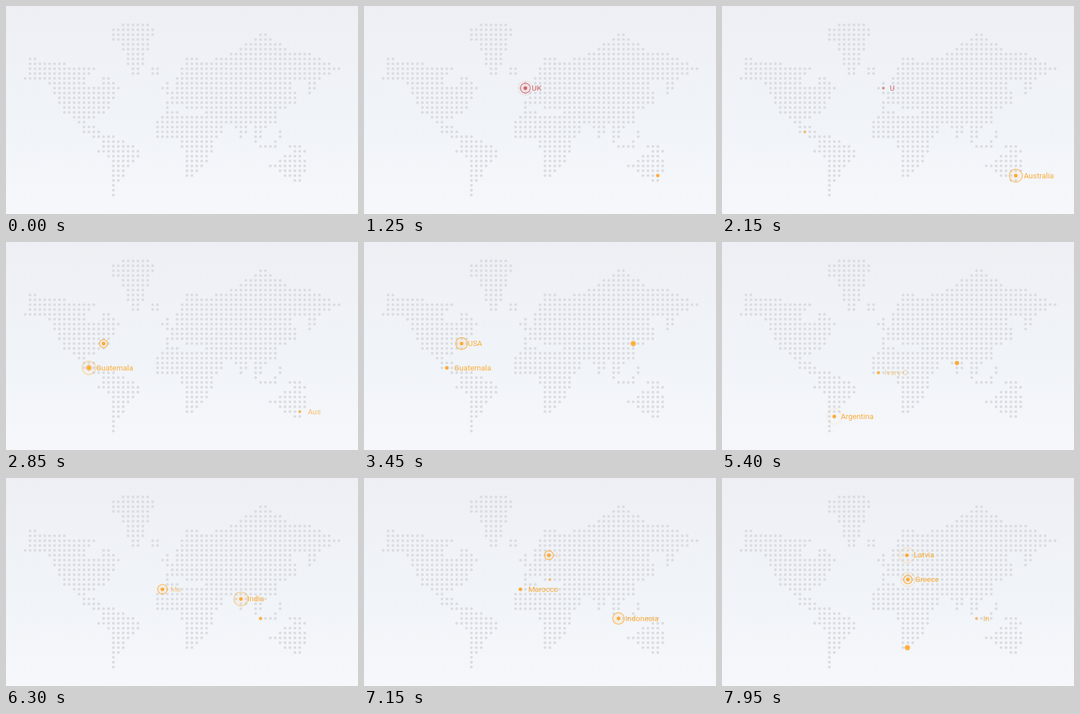
An HTML page for the animation above (8000 ms loop, 600 px wide and 356 px high).

```html
<!DOCTYPE html>
<html lang="en">
<head>
<meta charset="utf-8">
<title>Dotted world map</title>
<style>
  html, body { margin: 0; width: 100%; height: 100%; overflow: hidden; background: #f1f3f8; }
  svg { display: block; width: 100%; height: 100%; }
  text { font: 13px Roboto, Arial, sans-serif; white-space: pre; }
</style>
</head>
<body>
<svg viewBox="0 0 600 356">
  <defs>
    <linearGradient id="sky" x1="0" y1="0" x2="0" y2="1">
      <stop offset="0" stop-color="#eeeff4"/>
      <stop offset=".56" stop-color="#f0f4f8"/>
      <stop offset="1" stop-color="#f6f7fb"/>
    </linearGradient>
  </defs>
  <rect width="600" height="356" fill="url(#sky)"/>
  <g id="map" fill="#dbdce1"></g>
  <g id="pins"></g>
</svg>
<script>
const LOOP = 8000;
const LIFE = 1840;
const TYPE_AT = 380;
const LEAVE_AT = 1460;
const ORANGE = '#fcab37';
const map = document.getElementById('map');
const pins = document.getElementById('pins');

function set(el, attrs) {
  for (const k in attrs) el.setAttribute(k, attrs[k]);
}
function add(parent, tag, attrs) {
  const el = document.createElementNS('http://www.w3.org/2000/svg', tag);
  set(el, attrs);
  return parent.appendChild(el);
}
const gridX = col => 32.6 + col * 8.36;
const gridY = row => 32.4 + row * 8.32;
const clamp = v => Math.max(0, Math.min(1, v));
const mix = (a, b, u) => a + (b - a) * u;
const easeOut = u => 1 - (1 - u) * (1 - u);

// An outline is a few [row, west, east] corners; the coast runs straight between them.
function land(...corners) {
  corners.forEach(([row, west, east], i) => {
    const [row2, west2, east2] = corners[i + 1] || [row + 1, west, east];
    for (let r = row; r < row2; r++) {
      const u = (r - row) / (row2 - row);
      const end = Math.round(mix(east, east2, u));
      for (let c = Math.round(mix(west, west2, u)); c <= end; c++) {
        add(map, 'circle', { cx: gridX(c), cy: gridY(r), r: 2.4 });
      }
    }
  });
}

// Greenland, Iceland
land([0, 20, 25], [1, 18, 26], [3, 18, 25], [4, 20, 25], [10, 22, 23]);
land([9, 26, 27], [10, 26, 27]);
// The Americas
land([7, 1, 2], [8, 1, 8], [9, 1, 14], [11, 0, 12], [12, 5, 12], [13, 6, 19], [18, 8, 16], [20, 11, 12],
  [22, 12, 15], [24, 16, 20], [26, 15, 23], [28, 18, 22], [33, 18, 18], [35, 18, 18]);
land([11, 16, 17], [12, 16, 18]);
// Britain, Scandinavia, Iberia
land([12, 29, 29], [13, 28, 29], [14, 29, 29]);
land([7, 33, 35], [8, 33, 36]);
land([17, 29, 29], [18, 29, 31]);
// Europe and Asia
land([2, 48, 49], [5, 44, 53], [6, 42, 58], [9, 32, 64], [11, 31, 60], [12, 31, 54], [16, 29, 55], [17, 33, 53], [18, 37, 51]);
land([12, 58, 59], [14, 58, 58]);
land([21, 43, 45], [23, 44, 44]);
land([21, 47, 49], [24, 47, 47]);
land([22, 52, 52], [24, 51, 51], [25, 48, 51]);
// Africa and Arabia
land([19, 28, 51], [20, 27, 51], [21, 27, 40], [23, 27, 39], [24, 32, 38], [28, 33, 37], [31, 33, 34]);
// Australia
land([25, 54, 56], [26, 55, 57], [27, 53, 56], [29, 50, 57], [32, 55, 56]);

function place(name, start, col, row, gap, color = ORANGE) {
  const cx = gridX(col), cy = gridY(row);
  const g = add(pins, 'g', { fill: color });
  const ring = () => add(g, 'circle', { cx, cy, stroke: color, 'fill-opacity': 0.12 });
  return {
    name, start, g,
    rings: [ring(), ring()],
    dot: add(g, 'circle', { cx, cy }),
    label: add(g, 'text', { x: cx + gap, y: cy + 4.2 })
  };
}

const places = [
  place('UK', 350, 29, 13, 11, '#d26366'),
  place('Australia', 1120, 56, 31, 13.7),
  place('Guatemala', 2100, 13, 22, 12.5),
  place('USA', 2480, 16, 17, 10.6),
  place('China', 3225, 51, 17, 8.2),
  place('Ivory Coast', 3790, 28, 23, 10.3),
  place('Argentina', 4150, 19, 32, 11),
  place('India', 5220, 44, 21, 11),
  place('Marocco', 5850, 28, 19, 13.2),
  place('Indonesia', 6190, 48, 25, 11.4),
  place('Latvia', 6740, 33.8, 12, 11.8),
  place('Greece', 7100, 34, 17, 12.3),
  place('South Africa', 7725, 33.9, 31, 12)
];

const pulses = [
  { from: 160, len: 800, r0: 2.5, r1: 12.3 },
  { from: 730, len: 560, r0: 3.5, r1: 13.2 }
];

function drawPlace(p, t) {
  const alive = t >= 0 && t < LIFE;
  p.g.setAttribute('display', alive ? 'inline' : 'none');
  if (!alive) return;

  pulses.forEach(({ from, len, r0, r1 }, i) => {
    const u = clamp((t - from) / len);
    set(p.rings[i], {
      r: mix(r0, r1, easeOut(u)),
      'stroke-width': 1.2 + 0.6 * u,
      opacity: u > 0 ? 1 - u ** 1.6 : 0
    });
  });

  const grow = clamp(t / 150);
  const leave = clamp((t - LEAVE_AT) / (LIFE - LEAVE_AT));
  set(p.dot, {
    r: mix(2, 3.1, grow) * mix(1, 0.75, leave),
    opacity: mix(0.5, 1, grow) * mix(1, 0.6, leave)
  });

  const typed = Math.min(clamp((t - TYPE_AT) / 400), 1 - leave);
  const flicker = 0.68 - 0.28 * Math.cos((t - 1650) / 300 * 2 * Math.PI);
  p.label.textContent = p.name.slice(0, Math.ceil(p.name.length * typed));
  p.label.setAttribute('opacity', leave > 0 ? flicker : clamp((t - TYPE_AT + 30) / 200));
}

function draw(now) {
  const t = now % LOOP;
  for (const p of places) drawPlace(p, t - p.start);
}

const begin = performance.now();
function tick() {
  draw(performance.now() - begin);
  requestAnimationFrame(tick);
}
tick();
</script>
</body>
</html>
```
